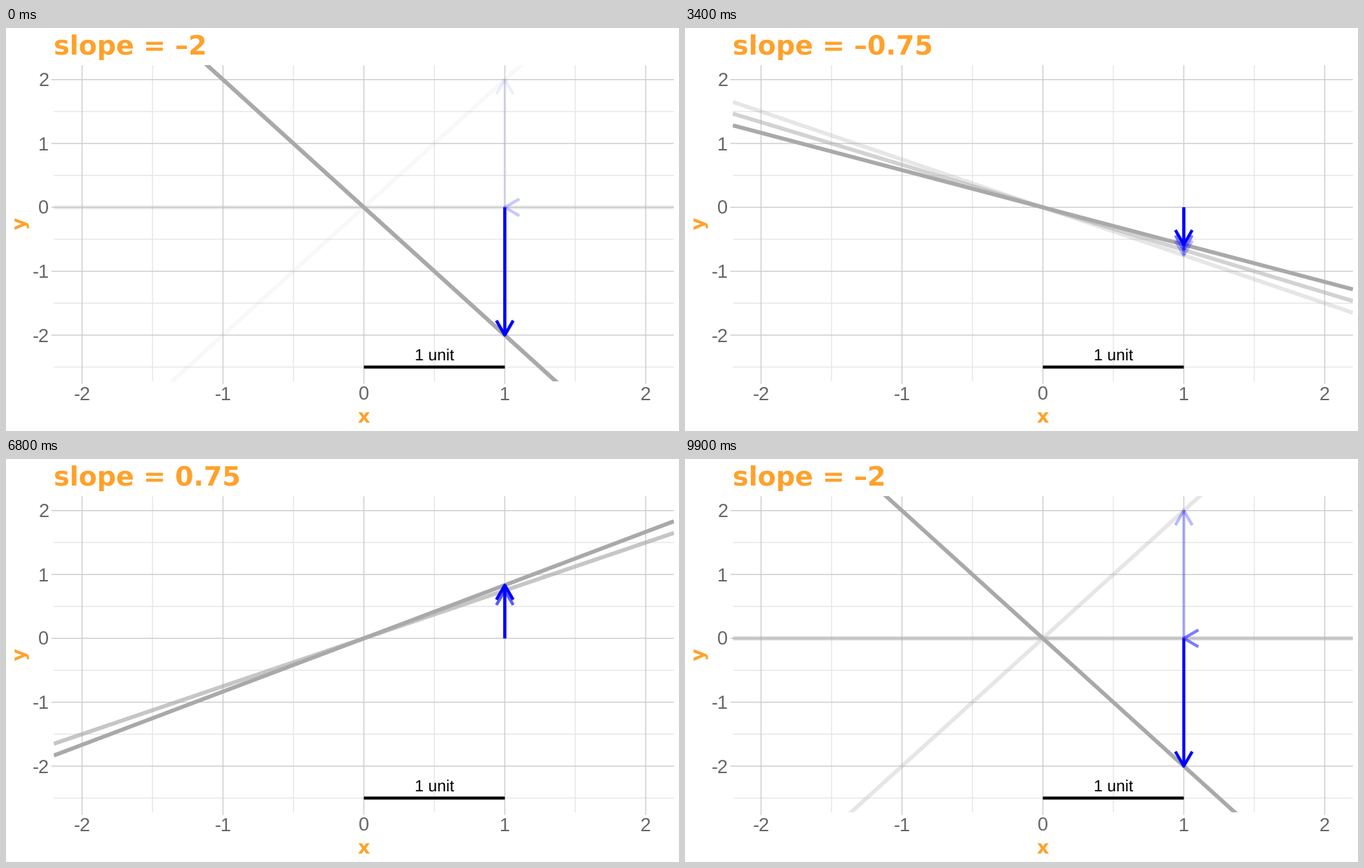
Animation of 960x576 px, one loop 10 s. Source, as a matplotlib script:

```python
import numpy as np
import matplotlib.pyplot as plt
from matplotlib.animation import FuncAnimation
from matplotlib.patches import Rectangle

W, H, DPI = 960, 576, 96
PX = 72 / DPI  # points per pixel
LEFT, RIGHT, TOP, BOTTOM = 68.3, 952.67, 53.3, 505.2
X0, Y0, UX, UY = 510.5, 256.35, 201.0, 91.3
ORANGE, GREY, BLUE = "#ffa12b", "#a9a9a9", "#0000ff"
HEAD, WAKE, XLIM = 24, 5, 2.2

plt.rcParams.update({
    "font.family": "Liberation Sans",
    "path.snap": False,
    "text.hinting": "none",
    "text.hinting_factor": 1,
    "axes.unicode_minus": False,
})

fig = plt.figure(figsize=(W / DPI, H / DPI), dpi=DPI, facecolor="white")
ax = fig.add_axes([0, 0, 1, 1])
ax.set_xlim(0, W)
ax.set_ylim(H, 0)
ax.axis("off")
panel = Rectangle((LEFT, TOP), RIGHT - LEFT, BOTTOM - TOP, transform=ax.transData)


def px(x):
    return X0 + UX * x


def py(y):
    return Y0 - UY * y


def stroke(xs, ys, color, width, z, alpha=1.0):
    line, = ax.plot(xs, ys, color=color, lw=width * PX, zorder=z, alpha=alpha,
                    solid_capstyle="butt", solid_joinstyle="round")
    return line


def label(x, y, text, size, color, ha="center", **kw):
    return ax.text(x, y, text, size=size, color=color, ha=ha, va="baseline",
                   rotation_mode="anchor", **kw)


def heading(x, y, text, size, **kw):
    return label(x, y, text, size, ORANGE, family="DejaVu Sans", weight="bold", **kw)


# Grid, ticks and labels
for v in np.arange(-2.5, 2.1, 0.5):
    major = v == int(v)
    color, z, tick = ("#cccccc", 1, 3.67) if major else ("#e6e6e6", 0, 0)
    stroke([LEFT - tick, RIGHT], [py(v)] * 2, color, 1.42, z)
    if v > -2.5:
        stroke([px(v)] * 2, [TOP, BOTTOM + tick], color, 1.42, z)
    if major:
        label(61.4, py(v) + 9.6, f"{v:g}", 20, "#666666", ha="right")
        label(px(v), 532, f"{v:g}", 20, "#666666")

stroke([px(0), px(1)], [py(-2.5)] * 2, "black", 4.27, 4)
label(px(0.5) + 0.5, 474.5, "1 unit", 17.07, "black")
heading(px(0), 564, "x", 20.6)
heading(28, (TOP + BOTTOM) / 2, "y", 20.6, rotation=90)
title = heading(LEFT, 38, "", 28.2, ha="left")

# Timeline: hold each slope, then move linearly to the next one;
# every eighth move is one step shorter so the loop fills 100 frames
states = np.arange(-2, 2.1, 0.25)
slopes, shown = [], []
for k, (a, b) in enumerate(zip(states, np.roll(states, -1))):
    steps = 2 if k and k % 8 == 0 else 3
    slopes += [a] * 3 + list(a + (b - a) * np.arange(1, steps + 1) / steps)
    shown += [a] * (2 + steps) + [b]
FRAMES = len(slopes)

# Fading echoes of the last few poses, the oldest lowest
echoes = []
for age in range(WAKE - 1, -1, -1):
    alpha = (1 - age / WAKE) ** 3
    z = -age / 10
    line = stroke([], [], GREY, 5.69, 2.5 + z, alpha)
    line.set_clip_path(panel)
    shaft, head = (stroke([], [], BLUE, 4.27, 3.5 + z, alpha) for _ in range(2))
    echoes.append((age, line, shaft, head))


def pose(slope, line, shaft, head):
    line.set_data([px(-XLIM), px(XLIM)], [py(-XLIM * slope), py(XLIM * slope)])
    x, y = px(1), py(slope)
    shaft.set_data([x, x], [py(0), y])
    # a zero-length arrow points left
    arms = np.sign(slope) * np.pi / 2 + np.array([-1, 1]) * np.pi / 6
    ex, ey = x + HEAD * np.cos(arms), y + HEAD * np.sin(arms)
    head.set_data([ex[0], x, ex[1]], [ey[0], y, ey[1]])


def update(i):
    for age, *artists in echoes:
        pose(slopes[(i - age) % FRAMES], *artists)
    title.set_text(f"slope = {shown[i]:g}".replace("-", "\u2013"))
    return []


anim = FuncAnimation(fig, update, frames=FRAMES, interval=100, repeat=True,
                     repeat_delay=0, blit=False)
plt.show()
```
